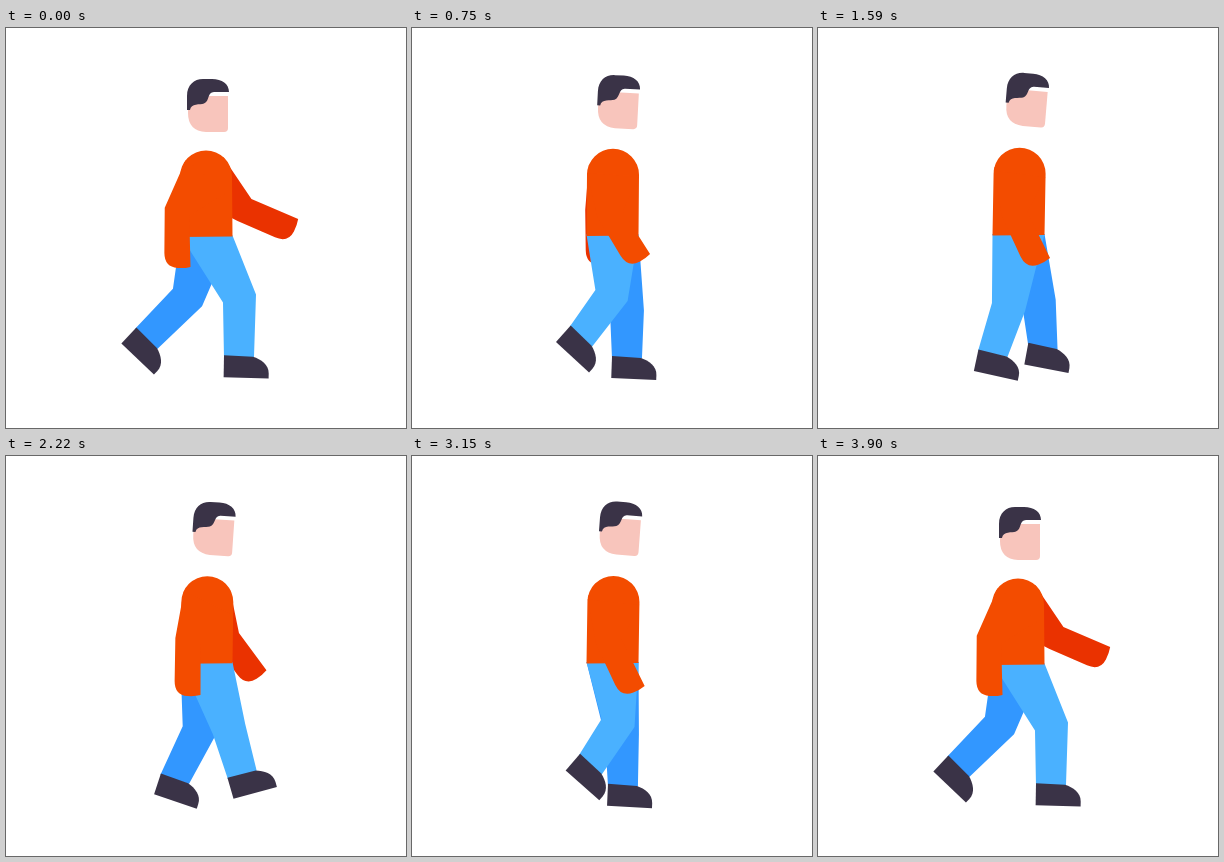
An HTML page that plays this animation: 400 px wide and 400 px high, repeating every 5930 ms.

```html
<!DOCTYPE html>
<html lang="en">
<head>
<meta charset="utf-8">
<title>Walking man</title>
<style>
  html, body { margin: 0; width: 100%; height: 100%; overflow: hidden; background: #fff; }
  svg { display: block; width: 100%; height: 100%; }
</style>
</head>
<body>
<svg viewBox="0 0 400 400">
  <path id="farArm" fill="#ea3200"/>
  <path id="farLeg" fill="#3297ff"/>
  <path id="farShoe" fill="#3a3347"/>
  <path id="nearLeg" fill="#4ab1ff"/>
  <path id="nearShoe" fill="#3a3347"/>
  <path id="torso" fill="#f34c00"/>
  <path id="nearArm" fill="#f34c00"/>
  <g id="head">
    <path fill="#f8c5bc" d="M-20 -10H20V22Q20 26 16 26H-2Q-20 25 -20 7Z"/>
    <path fill="#3a3347" d="M-21 4V-10C-21 -21 -14 -27 -5 -27H4C14 -27 21 -22 21 -14H6C-1 -14 2 -5 -4 -2.500C-8 -1 -17 -3 -18 4Z"/>
  </g>
</svg>
<script>
const LOOP = 5930, STEP = 30, WALK = 3900, CYCLE = 1200, LAST = 3000;

// phase, knee x, y, ankle x, y, foot angle
const LEG = [
  [0, 233.5, 270.5, 233, 328, 1],
  [.125, 215, 284, 215, 329, 2],
  [.16, 210, 279, 211, 329, 2.5],
  [.275, 192.5, 281, 186, 327.5, 4],
  [.325, 190.5, 279, 175, 325, 12],
  [.35, 193, 275, 169, 322.5, 18],
  [.5, 181.5, 269.5, 141, 310, 43],
  [.625, 199.5, 267.5, 169.5, 308, 42],
  [.66, 206, 267, 179, 308, 41],
  [.775, 220, 271, 218, 316, 27],
  [.825, 221, 275, 225, 318, 10.5],
  [.85, 223, 273, 236, 318, -16]
];

// phase, elbow x, y, hand x, y
const NEAR_ARM = [
  [0, 171, 184, 171.5, 239],
  [.275, 194.5, 186, 209.5, 238.5],
  [.325, 196.6, 186, 220.3, 235.6],
  [.5, 212, 188, 258, 214],
  [.625, 198, 186, 227, 232.8],
  [.66, 197, 186, 221, 235.6],
  [.85, 182, 185, 181.5, 239]
];
const FAR_ARM = [
  [0, 171, 184, 171.5, 239],
  [.125, 186, 184, 187, 236],
  [.35, 222, 184, 250, 222],
  [.5, 238.5, 182, 287, 203],
  [.65, 222, 184, 250, 222],
  [.86, 186, 184, 187, 237]
];

const get = id => document.getElementById(id);
const draw = (id, d) => get(id).setAttribute('d', d);
const pt = p => p[0].toFixed(2) + ' ' + p[1].toFixed(2);
const poly = points => 'M' + points.map(pt).join('L') + 'Z';
const along = (p, dir, k) => [p[0] + dir[0] * k, p[1] + dir[1] * k];
const unit = (x, y) => { const n = Math.hypot(x, y) || 1; return [x / n, y / n]; };
const toward = (a, b) => unit(b[0] - a[0], b[1] - a[1]);
const front = d => [d[1], -d[0]];

// Monotone cubic through keys that wrap around at phase 1
function sample(keys, phase) {
  const n = keys.length, p = phase - Math.floor(phase);
  const at = (i, c) => keys[(i + n) % n][c] + (c ? 0 : Math.floor(i / n));
  let i = n - 1;
  while (at(i, 0) > p) i--;
  const h = at(i + 1, 0) - at(i, 0), s = (p - at(i, 0)) / h;
  return keys[0].slice(1).map((_, k) => {
    const c = k + 1;
    const slope = j => (at(j + 1, c) - at(j, c)) / (at(j + 1, 0) - at(j, 0));
    const tangent = j => {
      const a = slope(j - 1), b = slope(j);
      return a * b > 0 ? 2 * a * b / (a + b) : 0;
    };
    const y0 = at(i, c), y1 = at(i + 1, c), s2 = s * s, s3 = s2 * s;
    return y0 + (y1 - y0) * (3 * s2 - 2 * s3)
      + h * tangent(i) * (s3 - 2 * s2 + s) + h * tangent(i + 1) * (s3 - s2);
  });
}

// Front direction across a bent joint
function across(a, joint, b) {
  const u = toward(a, joint), v = toward(joint, b);
  return front(unit(u[0] + v[0], u[1] + v[1]));
}

function leg(side, phase, hipY) {
  const [kx, ky, ax, ay, deg] = sample(LEG, phase);
  const knee = [kx, ky], ankle = [ax, ay], r = deg * Math.PI / 180;
  const cos = Math.cos(r), sin = Math.sin(r);
  const n = across([200.5, hipY], knee, ankle);
  const foot = (x, y) => [ax + x * cos - y * sin, ay + x * sin + y * cos];
  draw(side + 'Leg', poly([
    [174.5, hipY - 1], [226.5, hipY - 1], along(knee, n, 17),
    foot(15, 1), foot(-15, 1), along(knee, n, -17)
  ]));
  draw(side + 'Shoe', 'M' + pt(foot(-15, -.5)) + 'L' + pt(foot(14, .5))
    + 'C' + pt(foot(22, 3)) + ' ' + pt(foot(30, 8)) + ' ' + pt(foot(30, 17))
    + 'L' + pt(foot(30, 22)) + 'L' + pt(foot(-15, 21.5)) + 'Z');
}

function arm(side, keys, phase, shoulder) {
  const [ex, ey, hx, hy] = sample(keys, phase);
  const elbow = [ex, ey], hand = [hx, hy];
  const up = front(toward(shoulder, elbow)), dir = toward(elbow, hand), low = front(dir);
  const mid = across(shoulder, elbow, hand);
  const back = along(hand, low, -13);
  draw(side + 'Arm', 'M' + [
    along(shoulder, up, -26), along(shoulder, up, 26),
    along(elbow, mid, 13), along(hand, low, 13)
  ].map(pt).join('L')
    + 'Q' + pt(along(along(hand, low, 7), dir, 1.5)) + ' ' + pt(along(hand, dir, 1))
    + 'Q' + pt(back) + ' ' + pt(along(back, dir, -14))
    + 'L' + pt(along(elbow, mid, -13)) + 'Z');
}

// Steady walk whose final half cycle settles to rest
function walkPhase(t) {
  if (t <= LAST) return t / CYCLE;
  const x = Math.min(1, (t - LAST) / (WALK - LAST));
  return LAST / CYCLE + .5 * (1 - Math.pow(1 - Math.pow(x, 1.2), 3.12));
}

function render(t) {
  const p = walkPhase(t);
  const lift = Math.sin(2 * Math.PI * p) ** 2;
  const hipY = 208.5 - 2 * lift;
  const shoulder = [200 + 2 * lift, 148.5 - 3.5 * lift];
  const [sx, sy] = shoulder;

  arm('far', FAR_ARM, p + .5, shoulder);
  leg('far', p + .5, hipY);
  leg('near', p, hipY);
  draw('torso', 'M' + pt([174.5, hipY + .5]) + 'L' + pt([sx - 26, sy])
    + 'A26 26 0 0 1 ' + pt([sx + 26, sy]) + 'L' + pt([226.5, hipY]) + 'Z');
  arm('near', NEAR_ARM, p, shoulder);
  get('head').setAttribute('transform',
    `translate(${202 + 8.7 * lift} ${78 - 7.3 * lift}) rotate(${6 * lift})`);
}

const start = performance.now();
function tick() {
  const t = (performance.now() - start) % LOOP;
  render(Math.floor(t / STEP) * STEP);
  requestAnimationFrame(tick);
}
tick();
</script>
</body>
</html>
```
